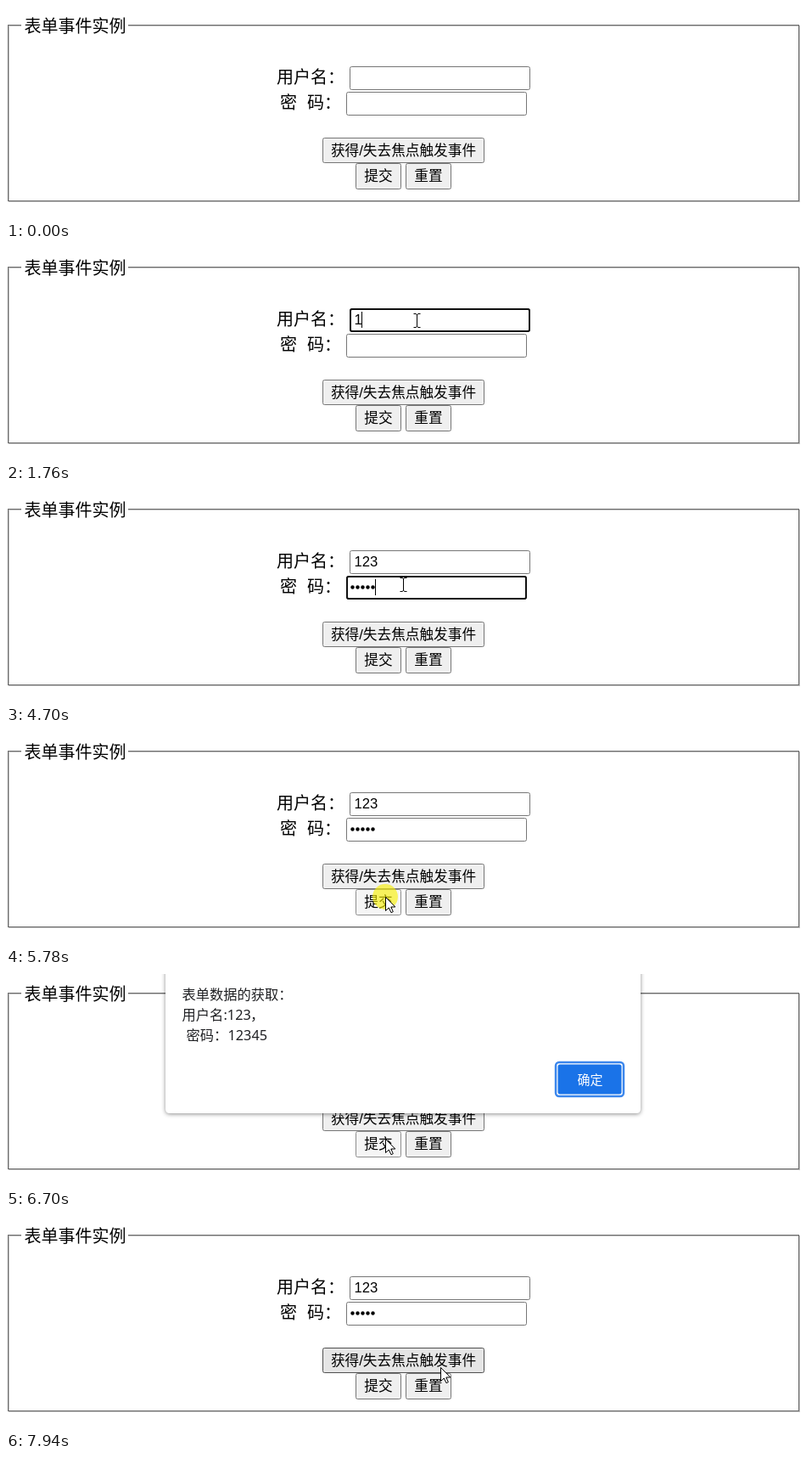
These frames come from a looping animation (943x252 px, 8000 ms). An HTML page:

```html
<!DOCTYPE html>
<html lang="zh-CN">
<head>
<meta charset="utf-8">
<title>表单事件实例</title>
<style>
  html, body { margin: 0; width: 100%; height: 100%; overflow: hidden; background: #fff; }
  svg { display: block; width: 100vw; height: 100vh; }
  text { font-family: "Noto Sans CJK SC", "Noto Sans CJK", sans-serif; font-weight: 350; white-space: pre; }
  .label { font-size: 20px; }
  .btn text { font-size: 16.67px; font-family: "Liberation Sans", "Noto Sans CJK SC", sans-serif; text-anchor: middle; }
  .btn rect { fill: #efefef; stroke: #767676; }
  .btn.hover rect { fill: #e5e5e5; stroke: #4f4f4f; }
  .btn.active rect { fill: #f5f5f5; stroke: #8d8d8d; }
  .field { fill: #fff; stroke: #767676; }
  .ring { fill: none; stroke: #101010; stroke-width: 2; }
  #name { font: 16.67px "Liberation Sans", Arial, sans-serif; }
  #alert text { font-size: 16.25px; fill: #202124; }
  #alert .num { font-family: "Noto Sans", "Open Sans", sans-serif; font-weight: 400; }
  #alert .ok { font-size: 15px; fill: #fff; text-anchor: middle; }
  #panel { filter: drop-shadow(0 1px 2.5px rgba(0,0,0,.45)); }
</style>
</head>
<body>
<svg viewBox="0 0 943 252" preserveAspectRatio="none">
  <g fill="none">
    <rect x="3.5" y="23.5" width="932" height="207" stroke="#c0c0c0"/>
    <rect x="2.5" y="22.5" width="932" height="207" stroke="#6c6c6c"/>
  </g>
  <rect x="18" y="21" width="126" height="5" fill="#fff"/>
  <g class="label">
    <text x="21.5" y="31">表单事件实例</text>
    <text x="319" y="90.5">用户名：</text>
    <text x="323" y="120.5">密</text>
    <text x="355" y="120.5">码：</text>
  </g>

  <rect class="field" x="405.5" y="71.5" width="212" height="27" rx="2"/>
  <rect class="field" x="401.5" y="101.5" width="212" height="27" rx="2"/>
  <rect class="ring" id="ringName" x="406" y="72" width="211" height="26" rx="2"/>
  <rect class="ring" id="ringPass" x="402" y="102" width="211" height="26" rx="2"/>
  <text id="name" x="410.5" y="90"></text>
  <g id="dots"></g>
  <rect id="caret" width="1" height="19"/>

  <g id="buttons"></g>

  <g id="alert">
    <path id="panel" fill="#fff" d="M188 -20H748V159Q748 164 743 164H193Q188 164 188 159Z"/>
    <text x="207.5" y="29.5">表单数据的获取：</text>
    <text x="207.5" y="53.5">用户名</text>
    <text class="num" x="256.5" y="53.5">:123</text>
    <text x="288" y="53.5">，</text>
    <text x="212.5" y="77.5">密码：</text>
    <text class="num" x="261.5" y="77.5">12345</text>
    <rect id="okRing" x="648" y="104" width="80" height="40" rx="4" fill="#fff" stroke="#3b86ec" stroke-width="2.5"/>
    <rect id="okFill" fill="#1a73e8"/>
    <text class="ok" x="688.5" y="129.5">确定</text>
  </g>

  <circle id="click" r="15" fill="#f8f000" fill-opacity=".62"/>
  <path id="arrow" fill="#fff" stroke="#000" d="M.5 .5V16.5L4.3 13 7 18.7 9.3 17.6 6.8 12H11.8Z"/>
  <path id="beam" fill="none" stroke="#000" d="M-3.5 -7.5H-1L.5 -6.5 2 -7.5H4.5M.5 -7V7.5M-3.5 8.5H-1L.5 7.5 2 8.5H4.5"/>
</svg>
<script>
const LOOP = 8000, TICK = 70, BLINK = 530, HOLD = 200;
const PRESS = { name: 830, pass: 2750, submit: 5650, ok: 7250 };
const ENTER = { at: 190, x: 745, y: 240 };
const glides = [
  { at: 190, last: 280, x: 540, y: 172 },
  { at: 470, last: 350, x: 484, y: 85 },
  { at: 2560, last: 190, x: 468, y: 111 },
  { at: 4700, last: 210, x: 446, y: 178 },
  { at: 5310, last: 140, x: 447, y: 194 },
  { at: 6700, last: 540, x: 680, y: 116 },
  { at: 7520, last: 420, x: 512, y: 178 }
];
const nameKeys = { first: 1760, gap: 300, count: 3 };
const passKeys = { first: 3100, gap: 365, count: 5 };

const $ = id => document.getElementById(id);
const clamp = v => Math.min(1, Math.max(0, v));
const show = (node, on) => { node.style.display = on ? '' : 'none'; };
const setAttrs = (node, attrs) => {
  for (const key in attrs) node.setAttribute(key, attrs[key]);
};
const svgNode = (tag, attrs, parent) => {
  const node = document.createElementNS('http://www.w3.org/2000/svg', tag);
  setAttrs(node, attrs);
  return parent.appendChild(node);
};

const dots = Array.from({ length: passKeys.count }, (_, i) =>
  svgNode('circle', { cx: 408.5 + 6 * i, cy: 114.5, r: 2.2 }, $('dots')));

const makeButton = (x, y, w, h, label) => {
  const node = svgNode('g', { class: 'btn' }, $('buttons'));
  svgNode('rect', { x: x + .5, y: y + .5, width: w - 1, height: h - 1, rx: 2 }, node);
  svgNode('text', { x: x + w / 2, y: y + 21 }, node).textContent = label;
  return { node, contains: p => p.x >= x && p.x < x + w && p.y >= y && p.y < y + h };
};
const focusButton = makeButton(373, 155, 191, 30, '获得/失去焦点触发事件');
const submitButton = makeButton(412, 185, 54, 31, '提交');
makeButton(471, 185, 54, 31, '重置');

// The pointer advances once per tick, in a straight line to each stop.
function pointerAt(t) {
  let { x, y } = ENTER;
  for (const glide of glides) {
    if (t < glide.at) break;
    const p = clamp(Math.floor((t - glide.at) / TICK + 1e-6) * TICK / glide.last);
    x += (glide.x - x) * p;
    y += (glide.y - y) * p;
  }
  return { x: Math.round(x), y: Math.round(y) };
}

const typedCount = (t, keys) =>
  Math.min(keys.count, Math.max(0, Math.floor((t - keys.first) / keys.gap) + 1));

function drawFields(t) {
  const inName = t >= PRESS.name && t < PRESS.pass;
  const inPass = t >= PRESS.pass && t < PRESS.submit;
  const typed = typedCount(t, nameKeys);
  const hidden = typedCount(t, passKeys);
  show($('ringName'), inName);
  show($('ringPass'), inPass);
  $('name').textContent = '123'.slice(0, typed);
  dots.forEach((dot, i) => show(dot, i < hidden));

  const keys = inName ? nameKeys : passKeys;
  const count = inName ? typed : hidden;
  const touched = count ? keys.first + (count - 1) * keys.gap : inName ? PRESS.name : PRESS.pass;
  show($('caret'), (inName || inPass) && Math.floor((t - touched) / BLINK) % 2 === 0);
  setAttrs($('caret'), inName ? { x: 410 + 9 * typed, y: 75 } : { x: 405 + 6 * hidden, y: 105 });
}

// 0 when the dialog is closed, 1 when fully open.
const opennessAt = t => Math.min(clamp((t - 5880) / 200), clamp((7590 - t) / 165));

function drawAlert(t, open) {
  const pressed = t >= PRESS.ok;
  show($('alert'), open > 0);
  setAttrs($('alert'), { opacity: 1 - (1 - open) ** 2, transform: `translate(0 ${-10 * (1 - open)})` });
  show($('okRing'), !pressed);
  setAttrs($('okFill'), pressed
    ? { x: 648, y: 103.5, width: 80, height: 41, rx: 4 }
    : { x: 650.5, y: 106.5, width: 75, height: 35, rx: 2.5 });
}

function drawButtons(t, open, pointer) {
  const pressed = t >= PRESS.submit && t < PRESS.ok + HOLD;
  const closing = !pressed && open > 0;
  const over = button => open === 0 && button.contains(pointer);
  focusButton.node.classList.toggle('hover', over(focusButton));
  submitButton.node.classList.toggle('hover', closing || !pressed && over(submitButton));
  submitButton.node.classList.toggle('active', pressed);
}

function drawPointer(t, pointer) {
  const beam = t >= PRESS.name - TICK && t < glides[3].at + TICK;
  const visible = t >= ENTER.at;
  show($('arrow'), visible && !beam);
  show($('beam'), visible && beam);
  show($('click'), Object.values(PRESS).some(at => t >= at && t < at + HOLD));
  for (const id of ['arrow', 'beam', 'click']) {
    setAttrs($(id), { transform: `translate(${pointer.x} ${pointer.y})` });
  }
}

const start = performance.now();
function draw(now) {
  const t = Math.max(0, now - start) % LOOP;
  const pointer = pointerAt(t);
  const open = opennessAt(t);
  drawFields(t);
  drawAlert(t, open);
  drawButtons(t, open, pointer);
  drawPointer(t, pointer);
  requestAnimationFrame(draw);
}
draw(start);
</script>
</body>
</html>
```
